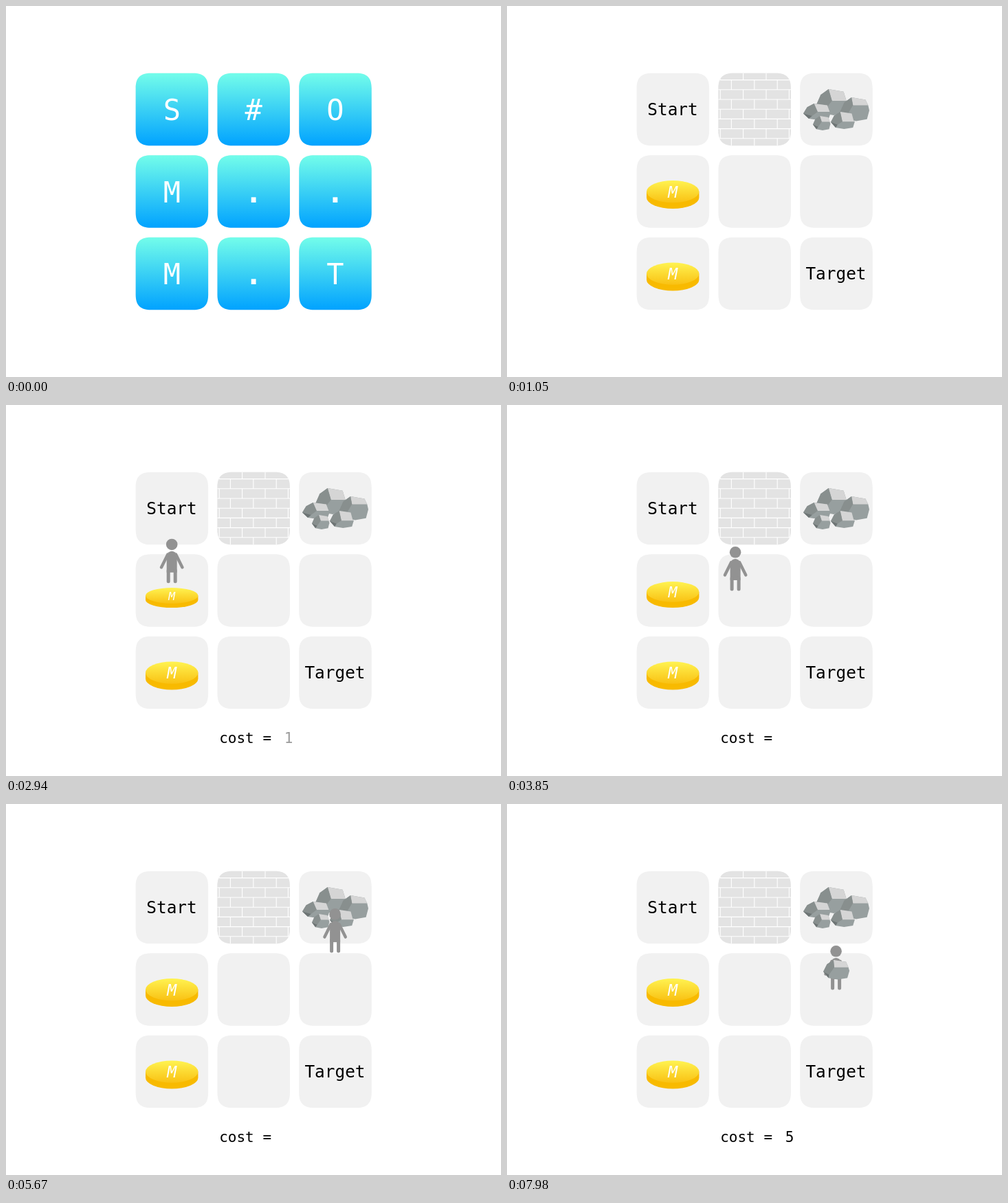
These frames come from a looping animation (720x540 px, 8 s). An HTML page:

```html
<!DOCTYPE html>
<html lang="en">
<head>
<meta charset="utf-8">
<title>Grid walk</title>
<style>
  html, body { margin: 0; width: 100%; height: 100%; overflow: hidden; background: #fff; }
  svg { display: block; width: 100%; height: 100%; }
  text { font-family: "DejaVu Sans Mono", monospace; white-space: pre; }
  .label { font-size: 24.4px; text-anchor: middle; }
  .cost { font-size: 21px; }
  .symbol { font-size: 42px; text-anchor: middle; fill: #fff; }
  .dot { font-weight: bold; }
  .mark { font-size: 23px; font-style: italic; text-anchor: middle; fill: #fff; }
</style>
</head>
<body>
<svg viewBox="0 0 720 540">
  <defs>
    <linearGradient id="sky" x2="0" y2="1">
      <stop stop-color="#73fdea"/><stop offset="1" stop-color="#00a2ff"/>
    </linearGradient>
    <linearGradient id="gold" x2="0" y2="1">
      <stop stop-color="#fff351"/><stop offset="1" stop-color="#f9c113"/>
    </linearGradient>
    <clipPath id="wallClip"></clipPath>
  </defs>
  <g id="board"></g>
  <g id="cover"></g>
  <g id="items"></g>
  <g id="hud">
    <text class="cost" x="310.2" y="492">cost =</text>
    <text id="count" class="cost" x="411" y="492" text-anchor="middle">0</text>
  </g>
  <g id="walker">
    <g fill="#929292" stroke="#929292" stroke-linecap="round">
      <circle cy="8.3" r="8.3" stroke="none"/>
      <path stroke="none" d="M-7.5 49V24Q-5 18 0 18T7.5 24V49Z"/>
      <path fill="none" stroke-width="4.4" d="M-6 23L-15.2 41.5M6 23L15.2 41.5"/>
      <path fill="none" stroke-width="5" d="M-5 46V62M5 46V62"/>
    </g>
    <g id="load"></g>
  </g>
</svg>
<script>
const $ = id => document.getElementById(id);
const PITCH = 119, TILE = 105.5;
const columns = [0, 1, 2].map(i => 241.4 + i * (PITCH - .2));
const rows = [0, 1, 2].map(i => 150.6 + i * (PITCH + .5));

// Square with smooth corners: `reach` is where a corner starts, `pull` its handle.
function tile(x, y, fill, reach = 22, pull = 6.7) {
  const h = TILE / 2, side = TILE - 2 * reach, a = reach - pull;
  return `<path fill="${fill}" d="M${x - h + reach} ${y - h}h${side}
    c${a} 0 ${reach} ${pull} ${reach} ${reach}v${side}
    c0 ${a} ${-pull} ${reach} ${-reach} ${reach}h${-side}
    c${-a} 0 ${-reach} ${-pull} ${-reach} ${-reach}v${-side}
    c0 ${-a} ${pull} ${-reach} ${reach} ${-reach}z"/>`;
}

const text = (x, y, content, cls) => `<text class="${cls}" x="${x}" y="${y}">${content}</text>`;
const tiles = paint => rows.map((y, r) => columns.map((x, c) => paint(x, y, r, c)).join('')).join('');

function coin(y, id) {
  return `<g transform="translate(241.2 ${y + 25})"><g id="${id}">
    <path fill="#f8ba00" d="M-38.2-25V-16.2A38.2 16.2 0 0 0 38.2-16.2V-25Z"/>
    <ellipse cy="-25" rx="38.2" ry="16.2" fill="url(#gold)"/></g>
    <g id="${id}Mark">${text(0, -16.4, 'M', 'mark')}</g></g>`;
}

function wall() {
  const course = 14.2, brick = 33.4;
  let d = '';
  for (let i = 0; i < 8; i++) {
    const y = 93.4 + i * course;
    d += `M307 ${y}h107`;
    for (let x = i % 2 ? 326.4 : 310.2; x < 413; x += brick) d += `M${x} ${y}v${course}`;
  }
  return tile(columns[1], rows[0], '#e3e3e3') +
    `<path clip-path="url(#wallClip)" d="${d}" fill="none" stroke="#fff" stroke-width="1.1"/>`;
}

// One faceted stone in a w by h box; the facets meet at (cx, cy) of the box.
function stone(x, y, w, h, cx, cy) {
  const left = [0, .6], shoulder = [.14, .22], top = [.39, 0], right = [.87, .1];
  const ridge = [.96, cy], core = [cx, cy], foot = [.2, .92];
  const face = (fill, ...points) =>
    `<polygon fill="${fill}" points="${points.map(([u, v]) => [x + u * w, y + v * h])}"/>`;
  return face('#979f9f', left, shoulder, top, right, ridge, [1, .55], [.92, .92], [.55, 1], foot) +
    face('#d5d5d5', top, right, ridge, core) +
    face('#888f8e', left, shoulder, top, core, [cx - .2, .75]) +
    face('#6d7474', left, [cx - .2, .75], foot);
}

const rocks = stone(450, 121, 45.5, 38, .5, .45) + stone(484.5, 133, 42.5, 34.5, .44, .33) +
  stone(431, 142, 40, 24, .52, .5) + stone(471, 154, 35, 25, .48, .57) + stone(445, 160, 25.5, 21, .5, .4);

$('wallClip').innerHTML = tile(columns[1], rows[0], '#000');
$('board').innerHTML = tiles((x, y) => tile(x, y, '#f1f1f1'));
$('items').innerHTML = wall() + rocks + coin(rows[1], 'pressed') + coin(rows[2], 'idle') +
  text(columns[0] - .4, rows[0] + 8.6, 'Start', 'label') +
  text(columns[2] - .5, rows[2] + 8.6, 'Target', 'label');

const symbols = ['S#O', 'M..', 'M.T'];
$('cover').innerHTML = tiles((x, y, r, c) => {
  const sign = symbols[r][c];
  return tile(x, y, 'url(#sky)') + text(x, y + 15.5, sign, sign === '.' ? 'symbol dot' : 'symbol');
});
$('load').innerHTML = stone(-18.5, 21, 38, 28.5, .42, .38);

const LOOP = 8000, STEP = 70, MOVE = 980, BEAT = 1045, FIRST = 2140, PICKUP = 650;
const stops = [[0, 66], [0, 206], [1, 206], [2, 206], [2, 52], [2, 206]]
  .map(([column, y]) => [241.2 + column * 118.7, y]);

const ramp = (t, from, to) => Math.min(1, Math.max(0, (t - from) / (to - from)));
const ease = u => (1 - Math.cos(Math.PI * u)) / 2;
const fade = (id, value) => $(id).setAttribute('opacity', value);
const place = (id, transform) => $(id).setAttribute('transform', transform);

function draw(t) {
  const reveal = ramp(t, 70, 910), shown = ramp(t, 1820, FIRST);
  const pickupStart = FIRST + 4 * BEAT;
  fade('cover', 1 - reveal);
  fade('items', reveal);
  fade('hud', shown);
  fade('walker', shown);
  fade('load', ramp(t, pickupStart, pickupStart + PICKUP));

  // The clock of the moves stands still while the stone is picked up.
  const clock = t - FIRST - Math.min(PICKUP, Math.max(0, t - pickupStart));
  const progress = i => ramp(clock, i * BEAT, i * BEAT + MOVE);
  const move = Math.min(4, Math.max(0, Math.ceil(clock / BEAT) - 1));
  const u = progress(move), p = ease(u);
  const [x, y] = stops[move].map((from, axis) => from + (stops[move + 1][axis] - from) * p);

  place('walker', `translate(${x} ${y})`);
  $('count').textContent = u < .5 ? move : move + 1;
  fade('count', u < .5 ? 1 - ramp(u, 0, .3) : ramp(u, .7, 1));

  const squash = 1 - .32 * (ease(progress(0)) - ease(progress(1)));
  place('pressed', `scale(1 ${squash})`);
  place('pressedMark', `scale(${squash})`);
}

const begin = performance.now();
function tick() {
  const t = (performance.now() - begin) % LOOP;
  draw(Math.floor(t / STEP) * STEP);
  requestAnimationFrame(tick);
}
tick();
</script>
</body>
</html>
```
